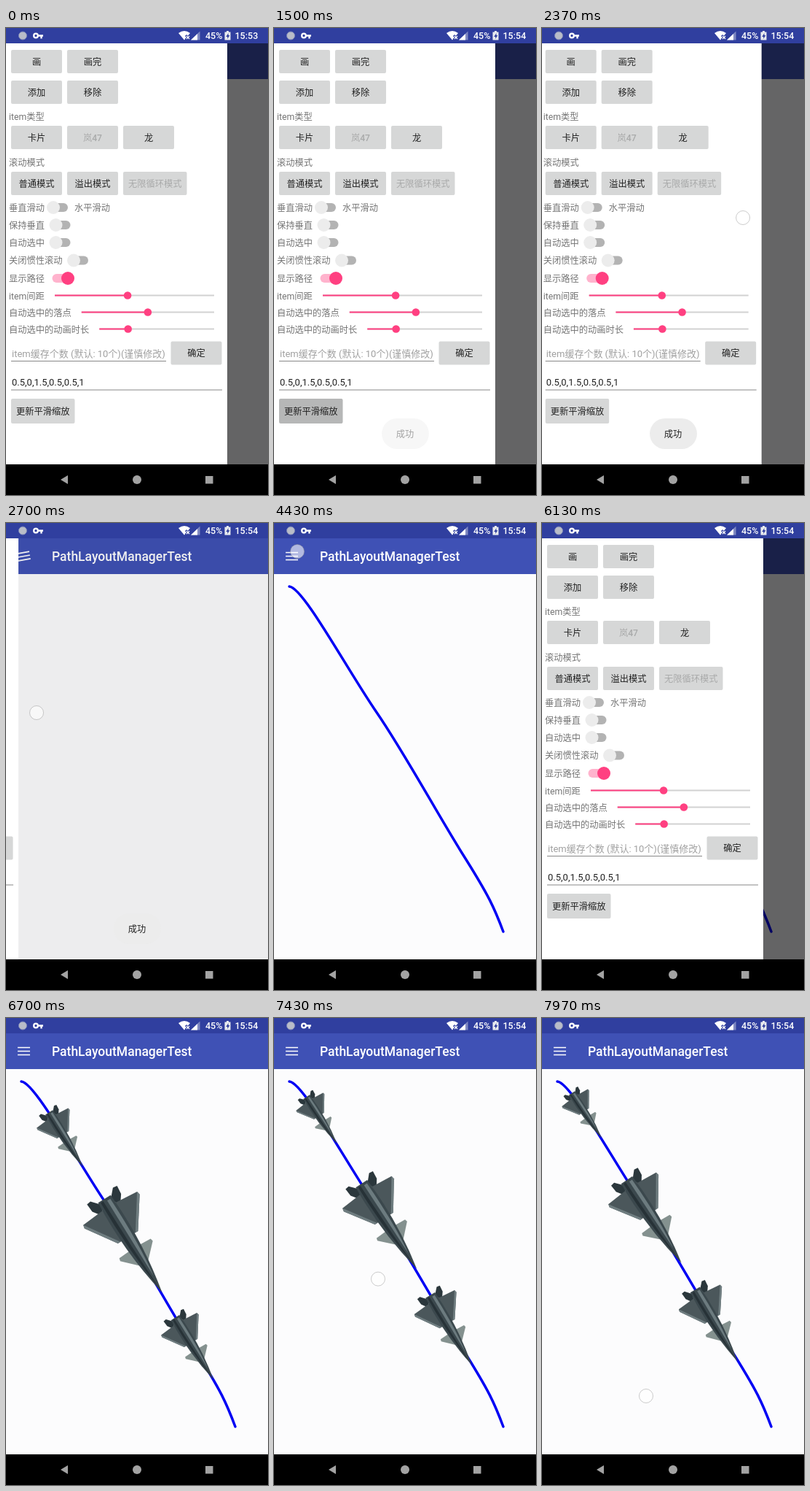
These frames come from a looping animation (360x640 px, 8000 ms). An HTML page:

```html
<!DOCTYPE html>
<html lang="zh-CN">
<head>
<meta charset="utf-8">
<title>PathLayoutManagerTest</title>
<style>
html, body { margin: 0; width: 100%; height: 100%; overflow: hidden; background: #000; }
svg { display: block; width: 360px; height: 640px; font: 12.25px Roboto, "Noto Sans CJK SC", "Noto Sans CJK", sans-serif; }
text { white-space: pre; }
.label { fill: #757575; }
.button { fill: #d6d7d7; }
.caption { fill: #222; font-weight: 500; text-anchor: middle; }
.disabled { fill: #a9aaaa; }
.status { fill: #fff; font-size: 12.5px; font-weight: 500; }
.nav { fill: #a3a3a3; }
</style>
</head>
<body>
<svg id="stage" viewBox="0 0 360 640"></svg>
<script>
const LOOP = 8000, DRAWER = 304, EM = 12.25;
const SPACING = .3, FIRST_JET = .171, DRAG = .532;
const ACCENT = '#ff4081', PRIMARY = '#3f51b5', PRIMARY_DARK = '#303f9f';
const stage = document.getElementById('stage');

const text = (x, y, s, attrs = 'class="label"') => `<text x="${x}" y="${y + 4.5}" ${attrs}>${s}</text>`;
const rect = (x, y, w, h, attrs) => `<rect x="${x}" y="${y}" width="${w}" height="${h}" ${attrs}/>`;
const circle = (x, y, r, attrs) => `<circle cx="${x}" cy="${y}" r="${r}" ${attrs}/>`;
const shape = (d, fill) => `<path d="${d}" fill="${fill}"/>`;
// Width of a label: CJK glyphs are one em, Latin about half
const widthOf = s => [...s].reduce((w, c) => w + (c < '\u0100' ? .5 : 1) * EM, 0);

function button(x, y, s, { h = 32, off = false, id = '' } = {}) {
  const w = Math.max(70, widthOf(s) + 14);
  return rect(x, y, w, h, `rx="2" class="button" id="${id}"`) +
    text(x + w / 2, y + h / 2, s, `class="caption ${off ? 'disabled' : ''}"`);
}

// A leading "-" marks the current, disabled choice
const buttonRow = (y, names) => names.map((s, i) =>
  button(7 + 77 * i, y, s.replace('-', ''), { off: s[0] === '-', id: s })).join('');

function toggle(y, s, on = false, gap = 15.5) {
  const x = 4 + widthOf(s) + gap;
  return text(4, y, s) +
    rect(x - 5, y - 6, 25, 12, `rx="6" fill="${on ? '#ffb3cd' : '#b3b3b3'}"`) +
    circle(on ? x + 16.5 : x, y, 9, `fill="${on ? ACCENT : '#ececec'}"`);
}

function slider(y, s, value) {
  const x = 18 + widthOf(s), length = 286 - x;
  return text(4, y, s) + rect(x, y - 1.5, length, 2, 'fill="#d2d2d2"') +
    rect(x, y - 1.5, length * value, 2, `fill="${ACCENT}"`) +
    circle(x + length * value, y - .5, 5.3, `fill="${ACCENT}"`);
}

const field = (y, w, s, color) => text(8, y, s, `fill="${color}" font-size="13"`) +
  rect(7, y + 10, w, 1, 'fill="#888"');

const drawer = rect(0, 21, DRAWER, 577, 'fill="#fff"') +
  buttonRow(30, ['画', '画完']) + buttonRow(72, ['添加', '移除']) +
  text(4, 121, 'item类型') + buttonRow(134, ['卡片', '-岚47', '龙']) +
  text(4, 184, '滚动模式') + buttonRow(197, ['普通模式', '溢出模式', '-无限循环模式']) +
  toggle(246, '垂直滑动', false, 12) + text(94, 246, '水平滑动') +
  toggle(270, '保持垂直') + toggle(294, '自动选中') +
  toggle(318.5, '关闭惯性滚动') + toggle(343, '显示路径', true) +
  slider(367, 'item间距', .457) + slider(390, '自动选中的落点', .5) + slider(413, '自动选中的动画时长', .25) +
  field(446, 213, 'item缓存个数 (默认: 10个)(谨慎修改)', '#a0a0a0') + button(226.5, 429.5, '确定') +
  field(485.5, 290, '0.5,0,1.5,0.5,0.5,1', '#222') +
  button(7, 508, '更新平滑缩放', { h: 34, id: '更新' });

// Jet along +x: one half is mirrored over the axis
const half = shape('M-60 8-71 18-70 24-58 23-44 13Z', '#2b373c') +
  shape('M-52 7-49 43-44 44-3 16V7Z', '#4b575b') + shape('M-49 43-44 44-3 16V12Z', '#6f7d80') +
  shape('M14 7 15 25 19 26 38 7Z', '#84918f');
const jet = `<g id="jet">${half}<g transform="scale(1 -1)">${half}</g>` +
  shape('M-64 10Q10 15 85 0Q10-15-64-10Z', '#3b484d') +
  shape('M-60-7Q10-9 60-2Q10-2-60-2Z', '#6c7b7f') +
  shape('M-62 3Q10 3 82 0Q10 9-62 7Z', '#273237') + '</g>';

const trackPath = 'M21 87C40 88 100 200 140 258S224 398 260 455S303 528 315 560';

const statusBar = rect(0, 0, 360, 21, `fill="${PRIMARY_DARK}"`) +
  circle(23, 10.5, 5.5, 'fill="#b9bdc8" stroke="#7c86b8"') +
  `<g fill="none" stroke="#fff" stroke-width="2.3">${circle(41, 10.5, 2.8, '')}<path d="M44 10.5h7M48.5 10.5v4"/></g>` +
  shape('M237 7Q245 1 253 7L245 16.5Z', '#fff') +
  `<path d="M247 10l6 6m0-6l-6 6" stroke="${PRIMARY_DARK}" stroke-width="3"/>` +
  '<path d="M248 11l4 4m0-4l-4 4" stroke="#fff" stroke-width="1.3"/>' +
  shape('M254 16.5 266.5 4.5V16.5Z', '#8089c2') + shape('M254 16.5 263 8V16.5Z', '#fff') +
  text(274, 10.5, '45%', 'class="status"') +
  shape('M303 4h3v1.5h2.5v11h-8v-11h2.5Z', '#e8ebef') +
  shape('M305.5 7l-3.2 5h2v3l3-5h-1.8Z', PRIMARY_DARK) +
  text(314.5, 10.5, '15:54', 'class="status" id="clock"');

stage.innerHTML = `<defs>${jet}</defs>` +
  rect(0, 21, 360, 577, 'fill="#fcfcfd"') +
  `<path id="track" d="${trackPath}" fill="none" stroke="#0000f4" stroke-width="3.5" stroke-linecap="round"/>` +
  `<g id="jets">${'<use href="#jet"/>'.repeat(5)}</g>` +
  rect(0, 21, 360, 49, `fill="${PRIMARY}"`) +
  '<path id="menu" d="M16 40.5h17M16 45.5h17M16 50.5h17" stroke="#fff" stroke-width="1.7"/>' +
  text(63, 47.5, 'PathLayoutManagerTest', 'fill="#fff" font-size="17.5" font-weight="500"') +
  rect(0, 21, 360, 577, 'id="scrim"') +
  `<g id="drawer">${drawer}</g>` + statusBar +
  rect(0, 598, 360, 42, 'fill="#000"') +
  '<path d="M75 619 85 613V625Z" class="nav"/>' + circle(180, 619, 6, 'class="nav"') +
  rect(274, 614, 10.5, 10.5, 'class="nav"') +
  '<g id="toast">' + rect(148, 535, 65, 42, 'rx="21" fill="#ececec"') +
  text(180, 556, '成功', 'fill="#222" text-anchor="middle"') + '</g>' +
  circle(0, 0, 9.5, 'id="touch" fill="#fff" fill-opacity=".6" stroke="#999" stroke-opacity=".5"');

const el = {};
stage.querySelectorAll('[id]').forEach(node => el[node.id] = node);
const jets = [...el.jets.children];
const trackLength = el.track.getTotalLength();

const clamp = v => Math.max(0, Math.min(1, v));
const ramp = (t, a, b) => clamp((t - a) / (b - a));
const smooth = v => v * v * (3 - 2 * v);
const quintOut = v => 1 - (1 - v) ** 5;
const lerp = (a, b, v) => a + (b - a) * v;
const show = (node, on) => node.style.display = on ? '' : 'none';
const along = f => el.track.getPointAtLength(clamp(f) * trackLength);

const drawn = t => ramp(t, 3270, 4070);
const dragged = t => DRAG * ramp(t, 6970, LOOP - 30);

function openness(t) {
  if (t < 4500) return 1 - smooth(ramp(t, 2350, 2760));
  if (t < 6200) return quintOut(ramp(t, 4500, 5012));
  return 1 - smooth(ramp(t, 6210, 6640));
}

const swipe = t => [28 + 250 * openness(t), 260];
// [start, end, position]
const gestures = [
  [1230, 1430, () => [50, 525]],
  [1800, 1950, () => [42, 46]],
  [2300, 2740, swipe],
  [3270, 4100, t => { const p = along(drawn(t)); return [p.x, p.y]; }],
  [4330, 4500, () => [32, 39]],
  [5280, 5430, () => [119, 46]],
  [6200, 6610, swipe],
  [6970, LOOP, t => [143, 518 + trackLength * (dragged(t) - DRAG)]],
];

function press(node, t, start) {
  const level = Math.min(ramp(t, start, start + 120), 1 - ramp(t, start + 350, start + 520));
  node.style.fill = `rgb(${lerp(214, 182, level)} ${lerp(215, 183, level)} ${lerp(215, 183, level)})`;
}

// Size peaks at 1.5 halfway along the path and is .5 at both ends
function placeJet(node, f) {
  show(node, f >= 0 && f <= 1);
  const p = along(f), a = along(f - .02), b = along(f + .02);
  const angle = Math.atan2(b.y - a.y, b.x - a.x) * 180 / Math.PI;
  const scale = (1.5 - 2 * Math.abs(f - .5)) / 1.426;
  node.setAttribute('transform', `translate(${p.x} ${p.y}) rotate(${angle}) scale(${scale})`);
}

function render(t) {
  const open = openness(t);
  el.clock.textContent = t < 1000 ? '15:53' : '15:54';

  el.drawer.setAttribute('transform', `translate(${DRAWER * (open - 1)} 0)`);
  el.scrim.setAttribute('opacity', .6 * open ** .8);
  el.menu.setAttribute('transform', `rotate(${-180 * open} 24.5 45.5)`);

  press(el.更新, t, 1260);
  press(el.画, t, 1830);
  press(el.画完, t, 5310);
  el.toast.setAttribute('opacity', Math.min(ramp(t, 1410, 1630), 1 - ramp(t, 3450, 3680)));

  show(el.track, t >= 3270);
  el.track.setAttribute('stroke-dasharray', `${drawn(t) * trackLength} 2000`);
  show(el.jets, t >= 5430);
  jets.forEach((node, i) => placeJet(node, FIRST_JET + dragged(t) + SPACING * (i - 2)));

  const gesture = gestures.find(([start, end]) => t >= start && t < end);
  show(el.touch, gesture);
  if (gesture) el.touch.setAttribute('transform', `translate(${gesture[2](t)})`);
}

function tick() {
  render(performance.now() % LOOP);
  requestAnimationFrame(tick);
}
tick();
</script>
</body>
</html>
```
